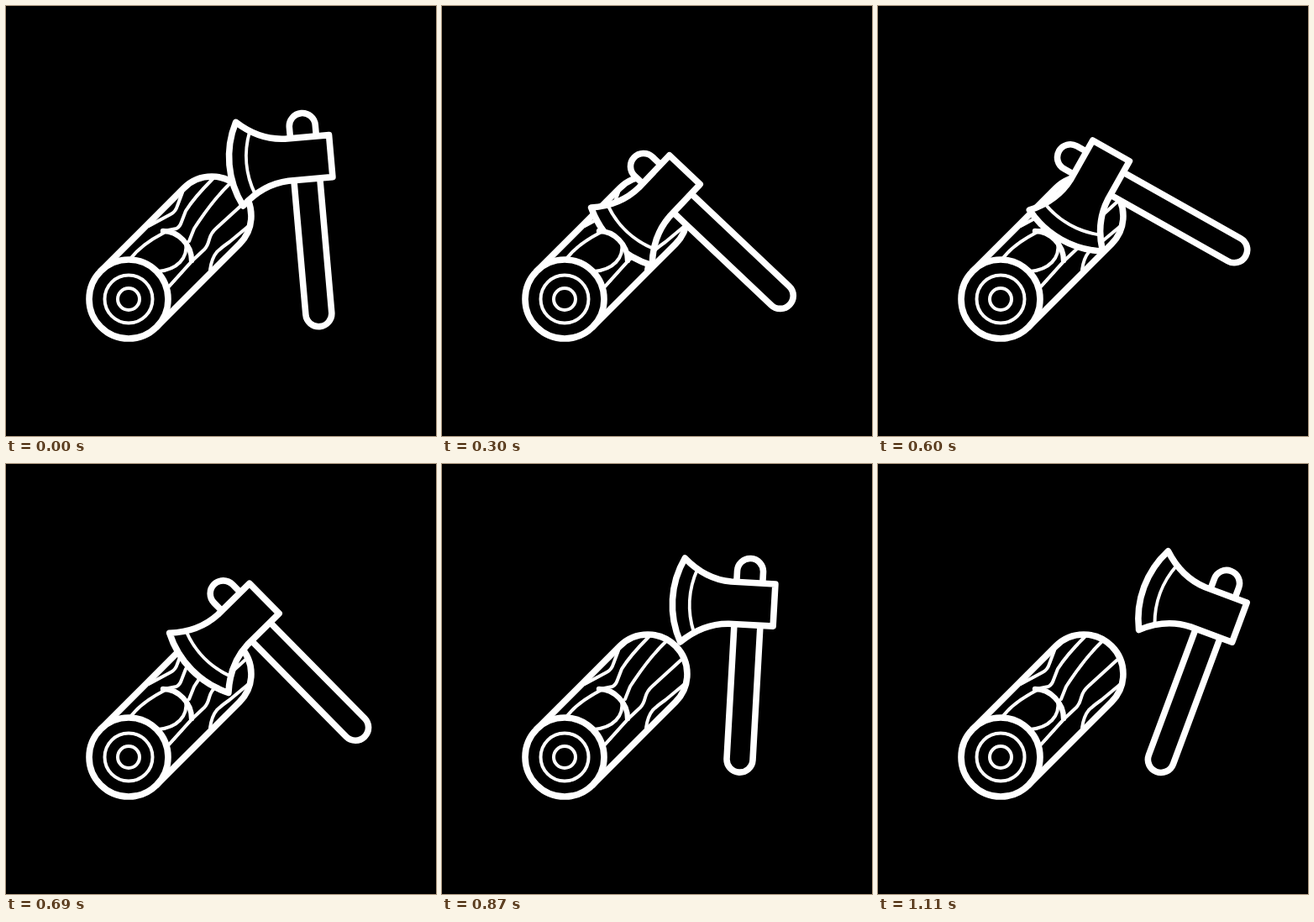
An HTML page that plays this animation: 512 by 512 pixels, repeating every 1230 ms.

```html
<!DOCTYPE html>
<html lang="en">
<head>
<meta charset="utf-8">
<title>Axe and log</title>
<style>
  html, body { margin: 0; width: 100%; height: 100%; overflow: hidden; background: #000; }
  svg { display: block; width: 100%; height: 100%; }
  path, circle { stroke: #fff; stroke-width: 7.6; stroke-linecap: round; stroke-linejoin: round; fill: #000; }
  .open { fill: none; stroke-width: 6.4; }
  .thin { fill: none; stroke-width: 4; }
  .mask { stroke: none; }
</style>
</head>
<body>
<svg viewBox="0 0 512 512">
  <!-- log body and grain -->
  <path d="M112.8 315.8 L211.8 216.8 A46.9 46.9 0 0 1 278.2 283.2 L179.2 382.2"/>
  <path class="thin" d="M170 262 L196 248 Q202 245 204 238 L210 222"/>
  <path class="thin" d="M188 268 L203 265 Q207 263 209 257 L214 244 Q224 228 246 206"/>
  <path class="thin" d="M218 280 L224 265 Q246 231 267 211"/>
  <path class="thin" d="M194 334 L221 304 L236 290 Q240 286 242 278 Q244 270 251 264 L285 233"/>
  <path class="thin" d="M243 314 Q245 300 251 293 Q256 288 266 281 L290 261"/>

  <g id="axe">
    <path d="M-15.5 0 A15.5 15.5 0 0 1 15.5 0 V224 A15.5 15.5 0 0 1 -15.5 224 Z"/>
    <path d="M-78.5 -11.6 Q-53 12 -22 13.3 H30.7 V63.5 H-22 Q-53 64.8 -78.5 88.4 A110 110 0 0 1 -78.5 -11.6 Z"/>
    <path class="thin" d="M-63 1 A104 104 0 0 0 -63 76"/>
  </g>

  <!-- near part of the log, in front of the blade -->
  <path class="mask" d="M187 268 Q221 270 221 305 L190 340 L130 312 Z"/>
  <path class="thin" d="M148 301 Q161 284 188 270"/>
  <path class="thin" d="M214 282 C217 300 204 314 181 316"/>
  <path class="thin" d="M194 334 L221 304"/>
  <path class="open" d="M187 268 C205 268 221 284 221 303"/>
  <circle cx="146" cy="349" r="47"/>
  <circle class="thin" cx="146" cy="349" r="28.5"/>
  <circle class="thin" cx="146" cy="349" r="13"/>
</svg>
<script>
const LOOP = 1230, STEP = 30, LAST = 1080, GRIP = 140;

// time, then angle and grip position
const keys = [
  [0, -5, 365, 282.5],
  [300, -46.6, 341.7, 287.2],
  [480, -57.7, 343, 262],
  [540, -61.2, 346, 252],
  [600, -60.6, 351, 249],
  [750, -28.5, 359, 259],
  [870, 3.2, 359.2, 267.8],
  [LAST, 20.4, 366.2, 273.2]
];
const axe = document.getElementById('axe');

const rise = (i, c) => (keys[i + 1][c] - keys[i][c]) / (keys[i + 1][0] - keys[i][0]);

// monotone tangent: flat at turning points, on impact and at the final rest
function slope(i, c) {
  if (i === 0) return rise(0, c);
  if (i === 1 || i === keys.length - 1) return 0;
  const a = rise(i - 1, c), b = rise(i, c);
  return a * b <= 0 ? 0 : 2 * a * b / (a + b);
}

function valueAt(t, c) {
  let i = 0;
  while (i < keys.length - 2 && t >= keys[i + 1][0]) i++;
  const span = keys[i + 1][0] - keys[i][0];
  const u = (t - keys[i][0]) / span, v = 1 - u;
  return keys[i][c] * v * v * (1 + 2 * u) + keys[i + 1][c] * u * u * (1 + 2 * v)
    + span * u * v * (slope(i, c) * v - slope(i + 1, c) * u);
}

function draw(time) {
  const t = Math.min(LAST, Math.floor((time % LOOP) / STEP) * STEP);
  const [angle, x, y] = [1, 2, 3].map(c => valueAt(t, c));
  axe.setAttribute('transform', `translate(${x} ${y}) rotate(${angle}) translate(0 ${-GRIP})`);
}

const start = performance.now();
function tick() {
  draw(performance.now() - start);
  requestAnimationFrame(tick);
}
draw(0);
requestAnimationFrame(tick);
</script>
</body>
</html>
```
